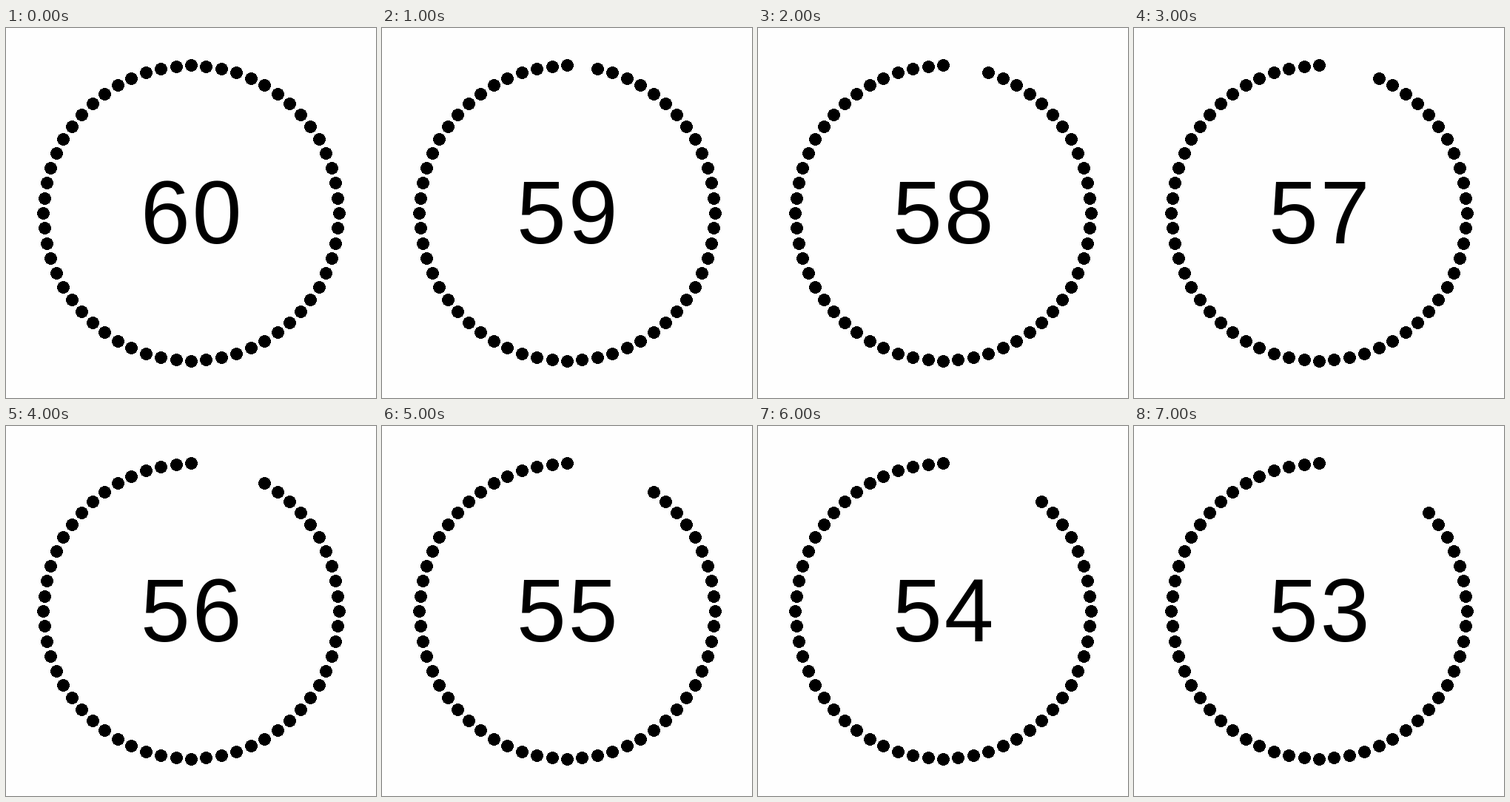
These frames come from a looping animation (500 by 500 pixels, 8000 ms). An HTML page with a canvas:

```html
<!DOCTYPE html>
<html lang="en">
<head>
<meta charset="utf-8">
<title>Countdown</title>
<style>
  html, body { margin: 0; width: 100%; height: 100%; overflow: hidden; background: #fefefe; }
  canvas { display: block; }
</style>
</head>
<body>
<canvas id="stage" width="500" height="500"></canvas>
<script>
const ctx = document.getElementById('stage').getContext('2d');
const CENTER = 250, RING = 200, DOT = 8.5;
const START = 60, STEPS = 8, STEP_MS = 1000;

// Crisp disc built from pixel rows.
function drawDot(x, y) {
  const reach = Math.floor(DOT);
  for (let dy = -reach; dy <= reach; dy++) {
    const half = Math.floor(Math.sqrt(DOT * DOT - dy * dy));
    ctx.fillRect(x - half, y + dy, 2 * half + 1, 1);
  }
}

function draw(elapsed) {
  ctx.fillStyle = '#fefefe';
  ctx.fillRect(0, 0, 500, 500);
  ctx.fillStyle = '#000';

  for (let i = 0; i < 60; i++) {
    if (i > 0 && i <= elapsed) continue;
    const turn = i * Math.PI / 30;
    // A tiny lean toward the vertical axis makes truncation stable.
    const angle = turn - 1e-9 * Math.sin(2 * turn);
    drawDot(CENTER + Math.trunc(RING * Math.sin(angle)),
            CENTER - Math.trunc(RING * Math.cos(angle)));
  }

  ctx.font = '120px "Liberation Sans", Arial, sans-serif';
  ctx.letterSpacing = '3px';
  ctx.fillText(String(START - elapsed), 182, 291);
}

let origin = null;
function tick(now) {
  origin ??= now;
  draw(Math.floor((now - origin) / STEP_MS) % STEPS);
  requestAnimationFrame(tick);
}
draw(0);
requestAnimationFrame(tick);
</script>
</body>
</html>
```
